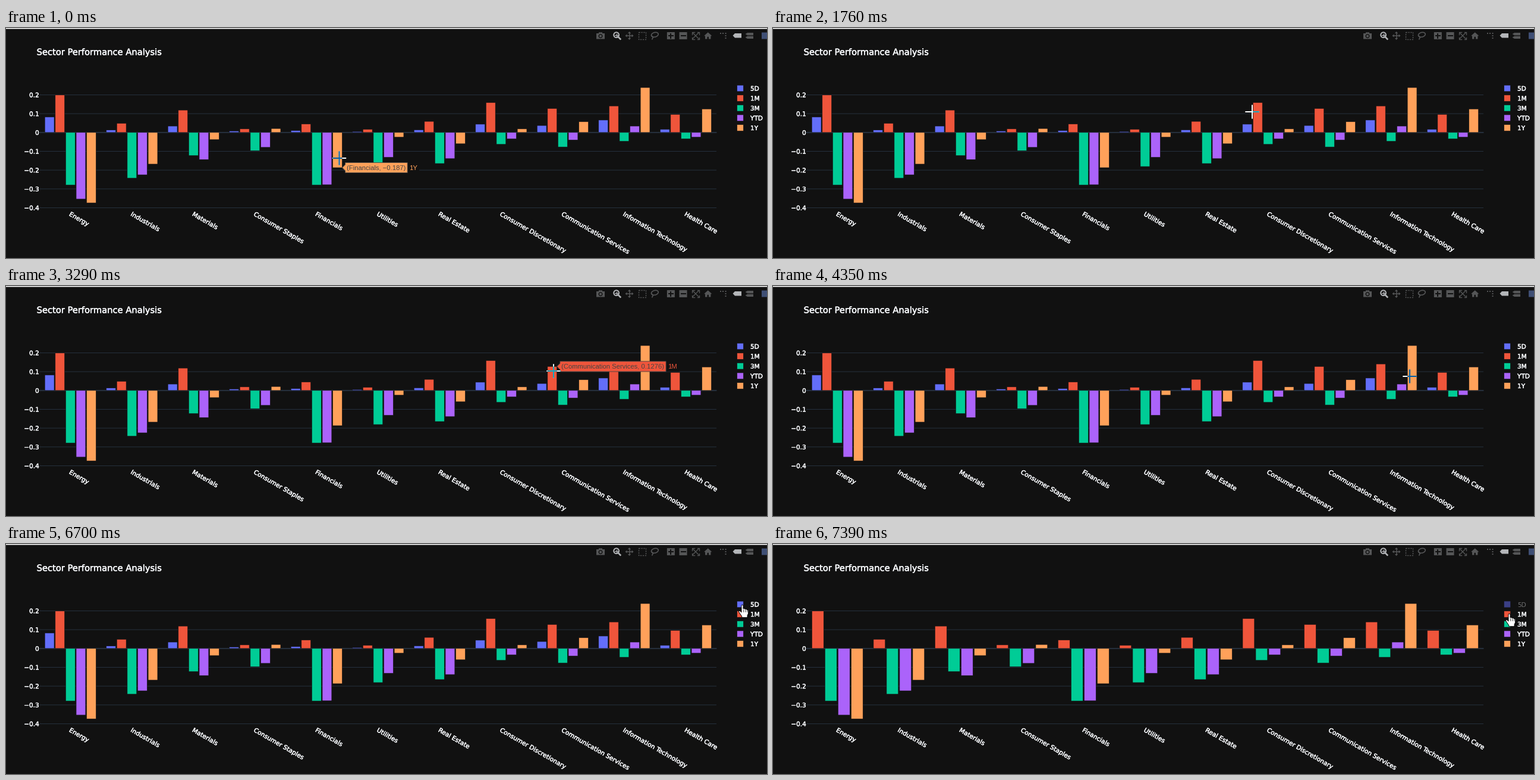
Write a matplotlib script that moves like this. It is 1280 px wide and 387 px high and loops after 8 s.

```python
import matplotlib.pyplot as plt
from matplotlib.animation import FuncAnimation
from matplotlib.patches import Circle, Ellipse, Polygon, Rectangle
from matplotlib.patheffects import withStroke

W, H, DPI = 1280, 387, 100
LOOP_MS, STEP_MS = 8000, 40
PT = 72 / DPI
BG, GRID, INK = "#111111", "#283442", "#f8fafd"
DIM, LIT = "#555657", "#b4b6b9"

COLORS = {"5D": "#636efa", "1M": "#ef553b", "3M": "#00cc96",
          "YTD": "#ab63fa", "1Y": "#ffa15a"}
SERIES = list(COLORS)
SECTORS = {
    "Energy": (.082, .199, -.279, -.354, -.374),
    "Industrials": (.013, .049, -.243, -.225, -.168),
    "Materials": (.034, .119, -.123, -.144, -.038),
    "Consumer Staples": (.008, .019, -.097, -.079, .021),
    "Financials": (.010, .045, -.279, -.278, -.187),
    "Utilities": (.005, .017, -.181, -.132, -.025),
    "Real Estate": (.014, .059, -.165, -.139, -.060),
    "Consumer Discretionary": (.044, .1592, -.063, -.034, .019),
    "Communication Services": (.037, .1276, -.077, -.040, .057),
    "Information Technology": (.066, .141, -.047, .034, .239),
    "Health Care": (.017, .096, -.034, -.025, .125),
}
LEFT, PITCH, ZERO, UNIT = 56.6, 103.5, 175.8, 316.6

# start ms, cursor kind, x, y, hovered bar
TRACK = [
    (0, "cross", 560.5, 219, ("Financials", "1Y")),
    (140, "cross", 570, 211, None),
    (270, "cross", 579, 202, None),
    (540, "cross", 597, 189, None),
    (660, "cross", 615, 176, None),
    (820, "cross", 621, 175, None),
    (950, "cross", 626, 175, None),
    (1100, "cross", 647, 169, None),
    (1250, "cross", 675, 164, None),
    (1370, "cross", 708, 158, None),
    (1490, "cross", 740, 152, None),
    (1640, "cross", 775, 146, None),
    (1760, "cross", 806, 141, None),
    (1910, "cross", 821, 141, ("Consumer Discretionary", "1M")),
    (2700, "cross", 832, 138, ("Consumer Discretionary", "1M")),
    (2820, "cross", 893, 138, None),
    (2980, "cross", 913, 138, ("Communication Services", "1M")),
    (3130, "cross", 920, 139, ("Communication Services", "1M")),
    (3290, "cross", 921, 143, ("Communication Services", "1M")),
    (3790, "cross", 923, 143, ("Communication Services", "1M")),
    (3930, "cross", 992, 150, None),
    (4080, "cross", 1020, 151, None),
    (4210, "cross", 1050, 152, None),
    (4350, "cross", 1071, 152, None),
    (4480, "cross", 1071, 152, ("Information Technology", "1Y")),
    (5130, "cross", 1078, 150, ("Information Technology", "1Y")),
    (5250, "cross", 1086, 148, ("Information Technology", "1Y")),
    (5380, "cross", 1094, 146, ("Information Technology", "1Y")),
    (5530, "cross", 1118.5, 141, None),
    (5650, "cross", 1148, 134, None),
    (5770, "cross", 1183, 126, None),
    (5890, "arrow", 1218, 114, None),
    (6010, "hand", 1232, 105, None),
    (6700, "hand", 1232, 102, None),
    (7120, "hand", 1232, 107, None),
    (7240, "hand", 1232, 112, None),
    (7390, "hand", 1232, 117, None),
]
HIDE_MS = 7000

HAND = [(5, 1.2), (6.5, .3), (8, 1.2), (8, 7), (10, 6.5), (11, 7.5), (13, 7.2),
        (14, 8.5), (15.5, 8.7), (16.5, 10), (16.5, 15), (15, 18.5), (15, 21.7),
        (6, 21.7), (5.5, 19.5), (2, 14.5), (.5, 11.8), (1, 10.4), (2.7, 10.6),
        (5, 13)]
ARROW = [(0, 0), (0, 16), (3.7, 12.5), (6.2, 18), (8.5, 17), (6.1, 11.6),
         (11.3, 11.3)]

fig = plt.figure(figsize=(W / DPI, H / DPI), dpi=DPI, facecolor=BG)
ax = fig.add_axes([0, 0, 1, 1])
ax.set(xlim=(0, W), ylim=(H, 0))
ax.axis("off")


def rect(x0, y0, x1, y1, color, z=2, **style):
    style = {"lw": 0, "snap": False, **style}
    return ax.add_patch(Rectangle((x0, y0), x1 - x0, y1 - y0, fc=color,
                                  zorder=z, **style))


def edged_rect(*args):
    return rect(*args, ec=BG, lw=.6 * PT)


def poly(points, color, z=3, **style):
    return ax.add_patch(Polygon(points, fc=color, zorder=z, **{"lw": 0, **style}))


def line(points, color, width=1.0, z=3, **style):
    xs, ys = zip(*points)
    return ax.plot(xs, ys, color=color, lw=width * PT, zorder=z, **style)[0]


def label(x, y, text, px, color=INK, font="DejaVu Sans", z=3, **style):
    return ax.text(x, y, text, fontsize=px * PT, color=color, family=font,
                   va="baseline", zorder=z, **style)


def chart_label(*args, **style):
    """Chart text, slightly emboldened."""
    effect = withStroke(linewidth=.3, foreground=INK)
    return label(*args, path_effects=[effect], **style)


def bar_boxes(names):
    """Bar rectangles keyed by (sector, series) for the visible series."""
    slot = PITCH * .85 / len(names)
    boxes = {}
    for i, (sector, values) in enumerate(SECTORS.items()):
        start = LEFT + PITCH * (i + .075)
        for j, name in enumerate(names):
            x0 = start + slot * (j + .05)
            y = ZERO - UNIT * values[SERIES.index(name)]
            boxes[sector, name] = (x0, min(y, ZERO), x0 + slot * .9,
                                   max(y, ZERO), COLORS[name])
    return boxes


def draw_bars(boxes):
    return [edged_rect(*box) for box in boxes.values()]


def draw_chart():
    rect(0, 0, W, 1.5, "white")
    chart_label(51.6, 45.4, "Sector Performance Analysis", 14.7)
    for k in range(-4, 3):
        y = ZERO - UNIT * k / 10
        line([(LEFT, y), (1194.5, y)], GRID, 1.8 if k == 0 else .9, z=1,
             snap=False)
        text = f"{k / 10:.1f}".replace("-", "\u2212") if k else "0"
        chart_label(55.8, y + 4, text, 10.5, ha="right")
    for i, sector in enumerate(SECTORS):
        chart_label(LEFT + PITCH * (i + .5) - 3, 315.2, sector, 10.5,
                    rotation=-30, rotation_mode="anchor")


def draw_legend():
    entries = {}
    for i, (name, color) in enumerate(COLORS.items()):
        y = 101.5 + 16.6 * i
        entries[name] = (edged_rect(1229.7, y - 5.3, 1240.3, y + 5.3, color, 3),
                         chart_label(1252, y + 4, name, 10.5))
    return entries


def draw_zoom_box(x, plus):
    rect(x - 6.5, 7, x + 6.5, 19, DIM)
    line([(x - 3.5, 13), (x + 3.5, 13)], BG, 2)
    if plus:
        line([(x, 9.5), (x, 16.5)], BG, 2)


def draw_tag(x0, y0, x1, y1, color):
    mid = (y0 + y1) / 2
    poly([(x0, mid), (x0 + 3.5, y0), (x1, y0), (x1, y1), (x0 + 3.5, y1)], color)


def draw_toolbar():
    # camera
    rect(993, 9, 1007, 18.5, DIM)
    rect(997, 7.3, 1003, 9.2, DIM)
    ax.add_patch(Circle((1000, 13.6), 3.5, fc=BG, lw=0, zorder=3))
    ax.add_patch(Circle((1000, 13.6), 2.1, fc=DIM, lw=0, zorder=3))
    # magnifier
    ax.add_patch(Circle((1026.6, 11.7), 4.4, fc="none", ec=LIT, lw=1.9 * PT, zorder=3))
    line([(1029.8, 15), (1033.3, 18.6)], LIT, 2.6)
    line([(1024.4, 11.7), (1028.8, 11.7)], LIT, 1.3)
    line([(1026.6, 9.5), (1026.6, 13.9)], LIT, 1.3)
    # pan
    cx, cy = 1048.5, 13
    line([(cx - 5, cy), (cx + 5, cy)], DIM, 1.5)
    line([(cx, cy - 5), (cx, cy + 5)], DIM, 1.5)
    for dx, dy in [(1, 0), (-1, 0), (0, 1), (0, -1)]:
        bx, by = cx + 4 * dx, cy + 4 * dy
        poly([(cx + 7 * dx, cy + 7 * dy), (bx + 2.6 * dy, by + 2.6 * dx),
              (bx - 2.6 * dy, by - 2.6 * dx)], DIM)
    # box and lasso select
    ax.add_patch(Rectangle((1063.5, 7.2), 12, 11.6, fc="none", ec=DIM,
                           lw=1.4 * PT, ls=(0, (1.6, 1.2)), zorder=3))
    ax.add_patch(Ellipse((1091.3, 11.3), 12, 7.6, angle=-15, fc="none", ec=DIM,
                         lw=1.6 * PT, zorder=3))
    line([(1086.3, 13.5), (1088.5, 15.5), (1086.8, 18.8)], DIM, 1.6)
    # zoom in, zoom out, autoscale
    draw_zoom_box(1118.3, True)
    draw_zoom_box(1139, False)
    cx, cy = 1160, 13
    line([(cx - 5, cy - 5), (cx + 5, cy + 5)], DIM, 1.3)
    line([(cx - 5, cy + 5), (cx + 5, cy - 5)], DIM, 1.3)
    for sx in (-1, 1):
        for sy in (-1, 1):
            line([(cx + 2.5 * sx, cy + 6 * sy), (cx + 6.3 * sx, cy + 6 * sy),
                  (cx + 6.3 * sx, cy + 2.5 * sy)], DIM, 1.3)
    # home
    poly([(1174, 13.3), (1180.7, 7.3), (1187.4, 13.3), (1185.4, 13.3),
          (1185.4, 18.5), (1182, 18.5), (1182, 14.8), (1179.4, 14.8),
          (1179.4, 18.5), (1176, 18.5), (1176, 13.3)], DIM)
    # spike lines
    for x, y in [(1202, 9), (1206, 9), (1210.5, 9), (1210.5, 13), (1210.5, 17)]:
        rect(x - 1, y - 1, x + 1, y + 1, DIM)
    # hover modes
    draw_tag(1222.5, 9, 1237, 16.5, LIT)
    draw_tag(1243.5, 8, 1257, 12.3, DIM)
    draw_tag(1243.5, 13.7, 1257, 18, DIM)
    rect(1271, 7.5, W, 18.5, "#3f4f75")


def text_width(artist):
    return artist.get_window_extent(fig.canvas.get_renderer()).width


def draw_tooltip(sector, name):
    """Hidden hover label for one bar; returns its artists and its box."""
    value = SECTORS[sector][SERIES.index(name)]
    x0, top, tip, bottom, color = all_boxes[sector, name]
    y = bottom if value < 0 else top
    number = f"{value:g}".replace("-", "\u2212")
    font = {"px": 11.3, "font": "Liberation Sans"}
    left, half, arrow = tip + 5.2, 8.6, 5.3
    text = label(left + 2.6, y + 4, f"({sector}, {number})", color="#444444",
                 z=7, **font)
    right = left + text_width(text) + 5.2
    tag = label(right + 3, y + 4, name, color=color, z=7, **font)
    backing = rect(right, y - half, right + text_width(tag) + 6, y + half, BG, 5)
    body = poly([(tip, y), (left, y - arrow), (left, y - half), (right, y - half),
                 (right, y + half), (left, y + half), (left, y + arrow)],
                color, 6, ec="#444444", lw=.9 * PT)
    artists = [text, tag, backing, body]
    for artist in artists:
        artist.set_visible(False)
    return artists, (left, y - half, right, y + half, color)


def inverted(color):
    return "#%06x" % (0xFFFFFF ^ int(color[1:], 16))


def draw_cross(x, y, boxes):
    """White crosshair that shows the inverse colour over each box."""
    artists = []
    for ax0, ay0, ax1, ay1 in [(x - 11.7, y - 1, x + 11.7, y + 1),
                               (x - 1, y - 11.7, x + 1, y + 11.7)]:
        artists.append(rect(ax0, ay0, ax1, ay1, "white", 8))
        for bx0, by0, bx1, by1, color in boxes:
            cut = max(ax0, bx0), max(ay0, by0), min(ax1, bx1), min(ay1, by1)
            if cut[0] < cut[2] and cut[1] < cut[3]:
                artists.append(rect(*cut, inverted(color), 9))
    return artists


def draw_pointer(shape, x, y):
    points = [(x + dx, y + dy) for dx, dy in shape]
    artists = [poly(points, "white", 8, ec="black", lw=.9 * PT)]
    if shape is HAND:
        artists += [line([(x + dx, y + 8), (x + dx, y + 12)], "black", .7, 9)
                    for dx in (8, 11, 14)]
    return artists


draw_chart()
legend = draw_legend()
draw_toolbar()
all_boxes = bar_boxes(SERIES)
short_boxes = bar_boxes(SERIES[1:])
all_bars, short_bars = draw_bars(all_boxes), draw_bars(short_boxes)
tooltips = {bar: draw_tooltip(*bar)
            for bar in dict.fromkeys(step[4] for step in TRACK) if bar}
cursor = []


def update(frame):
    # sample late in the step so that changes inside it are already visible
    now = frame * STEP_MS + STEP_MS - 10
    _, kind, x, y, hovered = [step for step in TRACK if step[0] <= now][-1]
    hidden = now >= HIDE_MS

    for bars, shown in ((all_bars, not hidden), (short_bars, hidden)):
        for bar in bars:
            bar.set_visible(shown)
    swatch, name = legend["5D"]
    swatch.set_alpha(.5 if hidden else 1)
    name.set_alpha(.4 if hidden else 1)
    name.set_path_effects([] if hidden else
                          [withStroke(linewidth=.3, foreground=INK)])
    for bar, (artists, _) in tooltips.items():
        for artist in artists:
            artist.set_visible(bar == hovered)

    while cursor:
        cursor.pop().remove()
    if kind == "cross":
        boxes = list((short_boxes if hidden else all_boxes).values())
        if hovered:
            boxes.append(tooltips[hovered][1])
        cursor.extend(draw_cross(x, y, boxes))
    else:
        cursor.extend(draw_pointer(HAND if kind == "hand" else ARROW, x, y))
    return cursor


anim = FuncAnimation(fig, update, frames=LOOP_MS // STEP_MS, interval=STEP_MS,
                     init_func=lambda: [], repeat=True, repeat_delay=0, blit=False)
plt.show()
```
